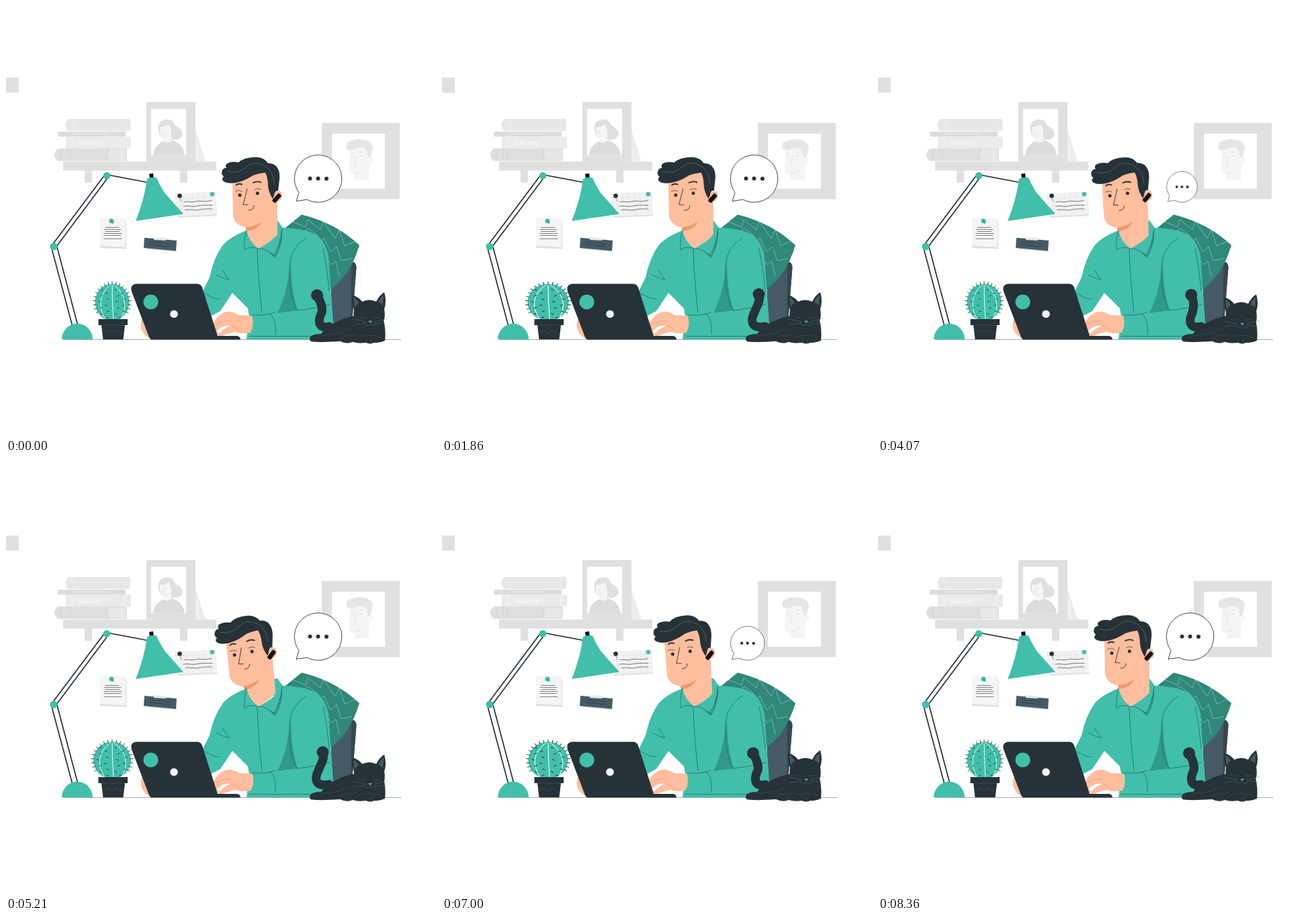
Write an HTML page that moves like this. It is 640 px wide and 640 px high and loops after 8.43 s.

```html
<!DOCTYPE html>
<html lang="en">
<head>
<meta charset="utf-8">
<title>Working from home</title>
<style>
  html, body { margin: 0; width: 100%; height: 100%; overflow: hidden; background: #fff; }
  svg { display: block; width: 100vw; height: 100vh; }
  .line { fill: none; stroke: #263238; stroke-linecap: round; stroke-linejoin: round; }
  .seam { fill: none; stroke: #205f56; stroke-width: .7; stroke-linecap: round; stroke-linejoin: round; }
  .dark { fill: #263238; }
  .teal { fill: #41bfab; }
  .skin { fill: #ffbe9d; }
  .pale { fill: none; stroke: #fff; stroke-linecap: round; stroke-linejoin: round; }
</style>
</head>
<body>
<svg viewBox="0 0 640 640" xmlns="http://www.w3.org/2000/svg">
  <g id="wall" fill="#e0e0e0">
    <rect y="106.500" width="19" height="22.500"/>
    <path d="M470 174H586V287.500H470ZM485 190V272H564V190Z" fill-rule="evenodd"/>
    <path d="M511 211L510 243Q511 251 518 251V259.500H540L541 234Q547 233 546.500 227Q545 223 541 225L539 208L518 206Z" fill="#f5f5f5"/>
    <path d="M507 213Q505 203 512 201Q521 197 533 199Q545 201 546 211L542 226H539L536 213Q527 208 517 214Q510 215 507 213Z" fill="#e6e6e6"/>
    <path d="M521 224L518 236L522 237M513 220L518 218M527 218L533 217M519 249Q527 249 529 244" fill="none" stroke="#e0e0e0"/>
    <g fill="#e0e0e0"><circle cx="515.500" cy="224" r="1.200"/><circle cx="529" cy="223" r="1.200"/></g>

    <rect x="85" y="231.500" width="228" height="13.500"/>
    <path d="M117 245H128V263H117ZM259 245H270V263H259Z"/>
    <path d="M282 185L297 231.500H282Z" fill="#ededed"/>
    <path d="M209 143H282V231.500H209ZM216 153V222.500H268V153Z" fill-rule="evenodd"/>
    <path d="M227 186Q225 171 237 169Q249 167 252 178Q262 182 263 191Q261 200 249 199L240 201Q230 199 227 186Z" fill="#e0e0e0"/>
    <path d="M229 180Q237 181 242 176Q247 184 246 193V202L240 207L236 199Q231 198 230 192Z" fill="#f5f5f5"/>
    <path d="M219 222.500Q220 207 235 201Q239 207 247 200Q264 205 266 222.500Z" fill="#dcdcdc"/>
    <path d="M235 185L233 190L236 190M234 194Q238 195 239 192" fill="none" stroke="#dcdcdc" stroke-width=".7"/>

    <path d="M93 168H184Q187 177 184 186H93Q84 177 93 168Z" fill="#e7e7e7"/>
    <path d="M100 168Q96 177 100 186M104 168Q100 177 104 186M176 168Q179 177 176 186" fill="none" stroke="#efefef"/>
    <path d="M78 187H178V194.500H78Q76 191 78 187Z" fill="#dcdcdc"/>
    <path d="M99 190.500H152" fill="none" stroke="#e8e8e8" stroke-width="2"/>
    <path d="M89 194.500H186V212H89Z" fill="#ebebeb"/>
    <path d="M98 195V212M176 195V212" stroke="#f2f2f2" stroke-width="1.500"/>
    <text x="108" y="206.500" fill="#fafafa" font-family="Lato, Roboto, sans-serif" font-size="9" font-weight="700" transform="rotate(3 108 206)">GALAXY</text>
    <path d="M77 212H180V230.500H77Q67 221 77 212Z" fill="#dfdfdf"/>
    <path d="M84 213Q79 221 84 230M91 213V230M96 213V230M152 213Q147 221 152 230M161 213Q156 221 161 230" fill="none" stroke="#d2d2d2"/>
    <path d="M154 214H179V229H155Q150 221 154 214Z" fill="#e7e7e7"/>
  </g>

  <g id="notes">
    <path d="M251 280L312 277L314 312.500L255 315Z" fill="#e3e3e3"/>
    <path d="M251 279L312 276.500L313.500 310L254 313Z" fill="#f2f2f2"/>
    <path id="grid" fill="none" stroke="#e2e2e2" stroke-width=".6"/>
    <path class="line" stroke-width=".6" d="M265 291.500q4 -1 8 0t9 -.5t10 -.5t14 -1M264 298q5 -1 10 0t11 -.5t22 -1M267 303.500q7 -1 12 0t10 -.5t18 -1"/>
    <path class="line" stroke-width=".5" d="M258 283L261 291"/>
    <circle class="dark" cx="258.500" cy="282.500" r="3.300"/><circle class="teal" cx="307" cy="280" r="3.300"/>
    <path d="M140 316L179 319V361.500L140 360Z" fill="#dedede"/>
    <path d="M140 316l3 -1l3 2l3 -2l4 2l4 -2l4 2l4 -2l4 2l4 -2l5 1L178 359L140 357Z" fill="#f5f5f5"/>
    <path class="line" stroke-width=".6" d="M148 329.500H168M146 332.500H171M148 335.500H169M146 338.500H172M146 341.500H171M146 346.500H172"/>
    <circle class="teal" cx="157" cy="320" r="3.500"/><path class="line" stroke-width=".7" d="M157 320L160 324"/>
    <path d="M206 359L253 364L255 366L210 362Z" fill="#ddd"/>
    <path d="M206 345L254 349L253 364.500L205 360Z" fill="#455a64"/>
    <path d="M220 344L239 345.500L238 349L220 348Z" fill="#e9e9e9"/>
    <path class="line" stroke-width=".6" d="M215 351L244 354M214 355L243 358"/>
  </g>

  <path d="M85 496.500H588" stroke="#263238" stroke-width=".4"/>

  <g id="lamp">
    <path class="line" stroke-width="1.700" d="M67.500 359L98.500 475M75.500 357L106.500 474M68.500 356L147.500 250.700M73.500 360L152.500 254.300M150 251L213 263"/>
    <path class="teal" d="M83 496.300A23 23.500 0 0 1 129 496.300Z"/>
    <circle class="teal" cx="71" cy="358" r="5.600"/><circle class="teal" cx="150" cy="252.500" r="5.300"/>
    <path fill="#111" d="M213 250L219 249L220 257H214Z"/>
    <path class="teal" d="M210 257Q217 254 224 255.500Q229 268 236 278L264 309.500L193 320Q206 288 210 257Z"/>
  </g>

  <g id="cactus">
    <ellipse class="teal" cx="158" cy="441" rx="25.500" ry="27.500"/>
    <path class="pale" stroke-width=".9" d="M155 415Q130 437 149 469M158 414Q158 441 160 469M161 415Q187 437 170 469"/>
    <path id="spikes" class="line" stroke-width=".9"/>
  </g>
  <path class="dark" d="M137.500 466H181V475H177L174.500 496.300H144.500L142 475H137.500Z"/>
  <path class="line" style="stroke:#455a64" stroke-width=".6" d="M146 486l6 -4l6 5l6 -5l8 5M142 475H177"/>

  <g id="chair">
    <path fill="#455a64" d="M508 381Q521 378 521.500 389L515 472L484 478V420Z"/>
    <path fill="#37474f" d="M514 381Q521 380 521.500 389L515 472L513.500 473Z"/>
    <path fill="#2f887a" d="M411 334L440 310.500Q491 323 526 356Q512 402 483 422L462 380Z"/>
    <path class="pale" stroke-width=".6" opacity=".6" d="M426 321L446 329L449 318L468 333L472 321L490 346L496 333L504 357L520 350M441 337L450 331L463 341L470 350L473 345L483 366L492 358L499 379L514 376M478 376L484 385L491 380L496 402"/>
  </g>

  <g id="man">
    <path class="teal" d="M398 320L404 319L412 330L404 345H396Z"/>
    <g id="head">
      <path class="skin" d="M337 262L338 312Q340 327 359 330L357 346L376 364L404 344V291Q411 290 411 281Q409 272 401 277L391 246L350 248Z"/>
      <path fill="#eb996e" d="M357 329.500Q370 328 381 321Q375 333 358 335Z"/>
      <path class="dark" d="M324 261Q320 258 324 254Q320 251 321.500 246Q323 241 328 241Q325 236 331 233.500Q338 231 346 233Q354 225 372 225Q384 225 390 234Q400 234 404 241Q408 247 407 258L405 275Q400 274 399 282L397 287Q391 278 390 268Q390 256 386 248Q376 249 368 252Q354 261 342 263Q330 265 324 261Z"/>
      <path fill="none" stroke="#607d8b" stroke-width=".6" d="M330 246Q346 251 360 238Q371 229 387 239Q399 248 399 265"/>
      <path class="line" stroke-width="1.900" d="M342.500 266.500Q346 263.500 351 265.500M368 263Q374 260 379.500 262.500"/>
      <path class="line" stroke-width=".7" d="M341.500 276Q346 273 351 276M370 273Q374 270.500 379 273"/>
      <circle class="dark" cx="348" cy="281.500" r="2.500"/><circle class="dark" cx="374.300" cy="278.700" r="2.500"/>
      <path class="line" stroke-width=".9" d="M359 272L353 295.500L360 296M361 304Q369 304 369 297"/>
      <path fill="none" stroke="#eb996e" stroke-width=".7" d="M404 279Q408 277 408 281"/>
      <rect fill="#111" x="399.800" y="278.500" width="6.400" height="15" rx="2" transform="rotate(42 403 286)"/>
    </g>
    <path class="teal" d="M358 334Q332 344 322 357Q309 375 303 404L291 428L304 462L319 454L337 427L360 450L362 462L358 496.300H484Q489 485 487 472L480 372Q474 344 454 337Q440 331 410 330Q404 346 376 361Q362 352 358 334Z"/>
    <path fill="#31998a" d="M424 376Q420 425 404 457L434 453Q424 425 424 376Z"/>
    <path fill="#2f887a" d="M390 365L400 371Q408 358 411 331Q413 355 400 375Z"/>
    <path class="seam" d="M358 334Q354 345 355 363Q361 357 375 361M376 361Q386 360 398 371Q408 358 411 331M374 362Q375 405 381 456M447 345Q426 358 422 383Q421 425 428 440Q430 450 434 453M313 400Q321 405 332 408Q327 400 322 393M296 428Q309 436 318 436M366 460Q393 461 400 456M434 453Q463 450 482 444M392 457Q403 465 401 489M362 491.500H468M472 361Q478 390 481 425"/>
    <g id="hand">
      <path class="skin" d="M307 474Q314 461 325 456Q337 453 346 460L366 461Q370 474 364 486Q350 489 341 485Q331 487 319 492L313 487Q311 482 307 474Z"/>
      <path fill="#fff" d="M313 485Q321 474 334 476Q325 479 318 487Z"/>
      <path fill="none" stroke="#eb996e" stroke-width=".7" d="M311 475Q321 467 335 469M334 476Q343 478 346 483"/>
    </g>
  </g>

  <g id="laptop">
    <path class="skin" d="M203 465Q198 474 203 484Q208 494 217 494L208 465Z"/>
    <path class="dark" d="M195 413.500H284Q290 413.500 292 419L315 491H344Q349 492 349 496.500H218Q214.500 496.500 213 493L187 425Q184 414 195 413.500Z"/>
    <circle fill="#f4f4f4" cx="250" cy="458.500" r="5.800"/>
    <circle class="teal" cx="215.500" cy="440.500" r="11"/>
  </g>

  <g id="cat">
    <path id="tail" class="line" stroke-width="13"/>
    <circle id="tailTip" class="dark" r="9"/>
    <path class="dark" d="M452 495Q453 488 469 488Q476 477 490 471Q504 463 520 461H560Q566 478 564 498Q556 502 548 501Q542 504 536 501Q524 503 516 500Q508 504 497 499Q470 501 455 499.500Q452 499 452 495Z"/>
    <path fill="none" stroke="#52656e" stroke-width=".5" opacity=".8" d="M467 490Q490 491 511 481M497 499Q499 490 507 491Q514 492 522 489M506 501V496M513 501V495M536 502V496M544 502V496M528 492Q545 488 559 493"/>
    <g id="catHead">
      <path class="dark" d="M515 430Q525 433 530 440Q541 435 551 440Q556 430 563 426Q567 440 563 451Q566 469 557 475Q541 483 525 476Q515 469 518 452Q514 441 515 430Z"/>
      <path fill="#455a64" d="M517 433Q523 437 525 442Q521 444 519 449ZM562 430Q556 435 554 441Q560 443 561 447Z"/>
      <path fill="none" stroke="#607d8b" stroke-width=".5" opacity=".8" d="M525 463Q530 466 535 463M547 463Q552 466 557 463M542 473Q537 477 534 474M542 473Q547 477 550 474M536 470L516 466M536 472L517 474M548 470L568 465M548 472L565 473"/>
      <path class="teal" d="M539.500 468.500H545L542 472Z"/>
    </g>
  </g>

  <g id="bubble">
    <path fill="#fff" stroke="#263238" stroke-width=".9" d="M432 290.500L436 277.500A35.200 35.200 0 1 1 448 288Z"/>
    <g class="dark"><circle cx="452.500" cy="256.800" r="3"/><circle cx="464.500" cy="256.800" r="3"/><circle cx="477" cy="257" r="3"/></g>
  </g>
</svg>
<script>
const LOOP = 8430;
const el = id => document.getElementById(id);
const mix = (a, b, k) => a + (b - a) * k;
const swing = k => (1 - Math.cos(2 * Math.PI * k)) / 2;

// Sine-eased value between [time, value] stops.
function track(stops, t) {
  const i = stops.findIndex(s => s[0] > t);
  if (i < 0) return stops.at(-1)[1];
  if (i === 0) return stops[0][1];
  const [t0, v0] = stops[i - 1], [t1, v1] = stops[i];
  return mix(v0, v1, swing((t - t0) / (t1 - t0) / 2));
}

const headTurn = [[0, 0], [1650, 0], [2800, -1.8], [4050, -1.8], [5210, -5], [6000, -5], [8300, 0]];
const tailSway = [[0, 0], [1800, 1], [3430, .1], [5150, 1], [6900, 0]];
const catNod = [[0, 0], [2900, 0], [5250, 6.500], [6040, 0]];
const handShift = [[0, 0], [1800, 0], [2800, -2], [4070, -1], [5210, .6], [7000, -1.5], [8300, 0]];

function drawSpikes() {
  let d = "";
  for (let a = 148; a <= 392; a += 12.2) {
    const r = a * Math.PI / 180, c = Math.cos(r), s = Math.sin(r);
    d += `M${158 + 24.5 * c} ${441 + 26.5 * s}l${3.8 * c} ${4 * s}`;
  }
  for (let row = 0; row < 5; row++)
    for (const [i, x] of [-18, -8, 8, 18].entries()) {
      const y = 423 + row * 9 + (i % 2) * 4;
      const inset = Math.sqrt(1 - ((y - 441) / 30) ** 2);
      d += `M${158 + x * inset} ${y}l${row % 2 ? 2.5 : -2.5} ${i % 2 ? 1 : -1.5}`;
    }
  el("spikes").setAttribute("d", d);
}

function drawGrid() {
  let d = "";
  for (let i = 1; i < 7; i++) d += `M${251 + i * 8.700} ${279 - i * .4}l2.300 33.500`;
  for (let i = 1; i < 5; i++) d += `M${251.500 + i * .5} ${279 + i * 6.700}l60 -2.700`;
  el("grid").setAttribute("d", d);
}

function poseTail(k) {
  const x = mix(463, 471.5, k), y = mix(430.5, 429, k), low = mix(466, 461, k);
  el("tail").setAttribute("d",
    `M481 477C${low - 2} 481 ${low - 2} 468 ${low + 4} 456C${mix(472, 468, k)} 447 ${x + 4} 438 ${x} ${y}`);
  el("tailTip").setAttribute("cx", x);
  el("tailTip").setAttribute("cy", y);
}

function bubbleScale(t) {
  const k = (t % 3150 - 100) / 1690;
  return k > 0 && k < 1 ? 1 - .35 * swing(k) : 1;
}

function place(id, transform) {
  el(id).setAttribute("transform", transform);
}

function render(t) {
  place("head", `rotate(${track(headTurn, t)} 375 373)`);
  place("hand", `translate(${track(handShift, t)} 0)`);
  place("cactus", `translate(158 0) scale(${1 + .21 * swing(t / (LOOP / 2))} 1) translate(-158 0)`);
  place("catHead", `translate(0 ${track(catNod, t)})`);
  place("bubble", `translate(430 292) scale(${bubbleScale(t)}) translate(-430 -292)`);
  poseTail(track(tailSway, t));
}

const start = performance.now();
function tick() {
  render((performance.now() - start) % LOOP);
  requestAnimationFrame(tick);
}

drawSpikes();
drawGrid();
tick();
</script>
</body>
</html>
```
